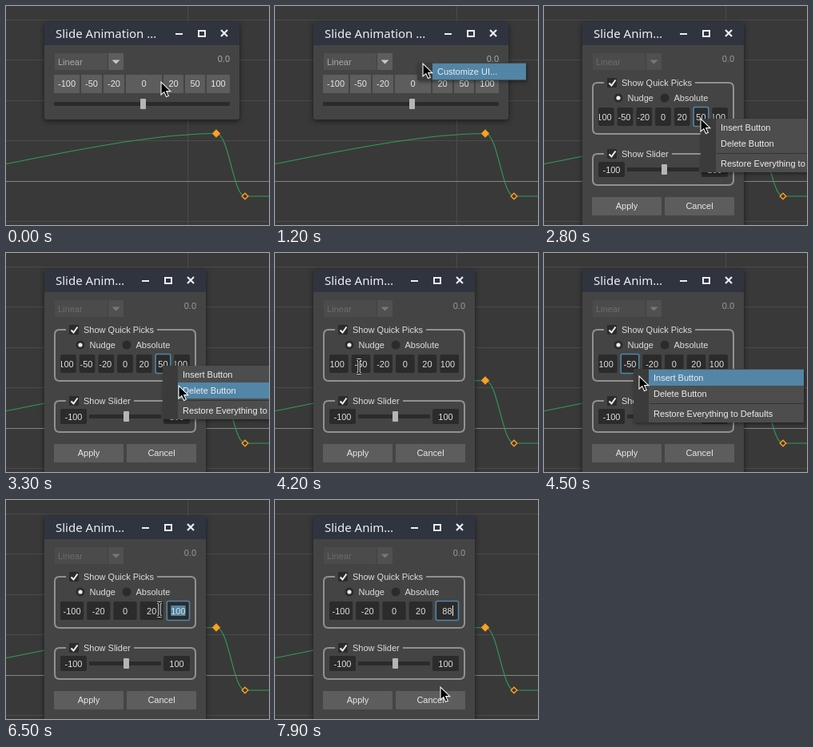
These frames come from a looping animation (329 px wide and 274 px high, 8 s). An HTML page:

```html
<!DOCTYPE html>
<html lang="en">
<head>
<meta charset="utf-8">
<title>Slide dialog</title>
<style>
html, body { margin: 0; width: 329px; height: 274px; overflow: hidden; background: #393939; }
svg { display: block; }
text { font: 11px "Liberation Sans", Arial, sans-serif; fill: #dedede; white-space: pre; }
.title { font: 500 15px "Noto Sans", "Open Sans", sans-serif; fill: #eceef2; }
.win { filter: drop-shadow(0 2px 3px rgba(0,0,0,.55)); }
.menu { filter: drop-shadow(1px 2px 2px rgba(0,0,0,.4)); }
</style>
</head>
<body>
<svg id="stage" width="329" height="274" viewBox="0 0 329 274"></svg>
<script>
const LOOP = 8000, TICK = 100;
const BLUE = '#5285a6', DARK = '#2b2b2b', BUTTON = '#5d5d5d';

// Pointer path: time, x, y of the hot spot
const PATH = [
  [0, 194, 95], [300, 194, 95], [600, 178, 71], [1100, 178, 71], [1400, 199, 75],
  [2100, 199, 75], [2500, 196, 141], [2900, 196, 141], [3300, 216, 166], [3600, 216, 166],
  [3900, 160, 160], [4200, 105, 142], [4400, 112, 145], [4700, 133, 171], [5200, 133, 171],
  [5600, 178, 152], [5900, 226, 142], [6000, 226, 141], [6300, 192, 137], [7500, 192, 137],
  [7700, 230, 185], [7900, 207, 234]
];

const EDIT_ITEMS = ['Insert Button', 'Delete Button', null, 'Restore Everything to Defaults'];
const MENUS = [
  { from: 800, to: 1900, x: 178, y: 71, w: 136, items: ['Customize UI...'] },
  { from: 2800, to: 3600, x: 196, y: 141, w: 213, items: EDIT_ITEMS, focus: 5 },
  { from: 4400, to: 5200, x: 112, y: 145, w: 213, items: EDIT_ITEMS, focus: 1 }
];

const rect = (x, y, w, h, fill, extra = '') =>
  `<rect x="${x}" y="${y}" width="${w}" height="${h}" fill="${fill}" ${extra}/>`;
const path = (d, stroke, width = 1, fill = 'none') =>
  `<path d="${d}" stroke="${stroke}" stroke-width="${width}" fill="${fill}"/>`;
const text = (s, x, y, anchor = 'start', fill = '#dedede') =>
  `<text x="${x}" y="${y}" text-anchor="${anchor}" style="fill:${fill}">${s}</text>`;
const textWidth = s => [...s].reduce((sum, c) => sum + (c === '-' ? 3.66 : 6.12), 0);

function pointer(t) {
  const i = PATH.findIndex(p => p[0] > t);
  if (i < 0) return PATH[PATH.length - 1].slice(1);
  const [t0, x0, y0] = PATH[i - 1], [t1, x1, y1] = PATH[i];
  const k = (t - t0) / (t1 - t0);
  return [Math.round(x0 + (x1 - x0) * k), Math.round(y0 + (y1 - y0) * k)];
}

function backdrop() {
  const rows = [17, 67, 118, 168, 269].map(y => `M0 ${y}.5H329`).join('');
  const diamond = (x, y, r, fill) =>
    path(`M${x} ${y - r}l${r} ${r}l${-r} ${r}l${-r} ${-r}z`, '#ff9f20', 1.4, fill);
  return rect(0, 0, 329, 274, '#393939') +
    path(rows + 'M227.5 0V274', '#4b4b4b') +
    path('M0 219.5H329', '#858585') +
    path('M0 197.5C90 180 185 160 263 159.5C279 159 284 238 299 238H329', '#2f9e58', 1.1) +
    diamond(263, 159.5, 4.2, '#ff9f20') + diamond(299, 238, 3.8, '#393939');
}

function frame(w, h, title) {
  const r = 48 + w, cx = r - 19;
  return `<g class="win">` + rect(48, 20, w, h, '#444', 'rx="3"') + '</g>' +
    path(`M48 49V23q0-3 3-3H${r - 3}q3 0 3 3V49z`, 'none', 0, '#2f343f') +
    `<text class="title" x="62" y="40">${title}</text>` +
    rect(cx - 61, 34, 9, 2, '#eceef2') +
    rect(cx - 32, 31, 8, 7, 'none', 'stroke="#eceef2" stroke-width="2"') +
    path(`M${cx - 4} 30l8 8m0 -8l-8 8`, '#eceef2', 2.2);
}

function combo(enabled) {
  const [base, side, ink, arrow] = enabled
    ? ['#505050', '#5d5d5d', '#aaa', '#c8c8c8'] : ['#4b4b4b', '#505050', '#6c6c6c', '#787878'];
  return rect(61, 59, 86, 21, base, 'rx="1"') + rect(128, 59, 19, 21, side) +
    path('M127.5 59V80', '#414141') + text('Linear', 65, 74, 'start', ink) +
    path('M132.500 67.500h10l-5 5z', 'none', 0, arrow);
}

const button = (label, x, y, w) =>
  rect(x, y, w, 23, BUTTON, 'rx="1"') + text(label, x + w / 2, y + 15, 'middle', '#e8e8e8');

const slider = (x, w, y, knob, h) =>
  rect(x, y, w, 5, DARK, 'rx="1"') + rect(knob, y - (h - 5) / 2, 7, h, '#b5b5b5', 'rx="1"');

function smallDialog() {
  const buttons = [['-100', 60, 32], ['-50', 94, 26], ['-20', 122, 26], ['0', 150, 45],
    ['20', 197, 25], ['50', 224, 25], ['100', 251, 29]];
  return frame(244, 122, 'Slide Animation ...') + combo(true) +
    text('0.0', 280, 70, 'end', '#aaa') +
    buttons.map(([s, x, w]) => button(s, x, 86, w)).join('') +
    slider(60, 220, 120, 168, 13);
}

function group(y, h, label, resume) {
  return path(`M75 ${y}H67q-6 0 -6 6v${h - 12}q0 6 6 6H231q6 0 6 -6v${12 - h}q0 -6 -6 -6H${resume}`, '#919191', 2) +
    rect(79, y - 6, 12, 12, DARK, 'rx="1"') +
    path(`M81.500 ${y + 0.5}l3 3l5 -7`, '#f0f0f0', 2) +
    text(label, 97, y + 4);
}

function radio(x, label, on) {
  return `<circle cx="${x}" cy="115" r="5.5" fill="${DARK}"/>` +
    (on ? `<circle cx="${x}" cy="115" r="2.6" fill="#ececec"/>` : '') +
    text(label, x + 11.5, 119);
}

function field(s, x, y, w, h, { focus, pick, caret } = {}) {
  const tw = textWidth(s);
  const end = tw > w - 6 ? w - (w < 22 ? 3 : 4.8) : (w + tw) / 2;
  const at = n => end - tw + textWidth(s.slice(0, n));
  let out = rect(x, y, w, h, DARK, 'rx="2"');
  if (focus) out += rect(x + .5, y - .5, w - 1, h + 1, 'none', `rx="2" stroke="${BLUE}" stroke-width="1.6"`);
  out += `<svg x="${x + 1}" y="${y}" width="${w - 2}" height="${h}"><g transform="translate(-1 0)">`;
  if (pick !== undefined) out += rect(at(pick), 5, end - at(pick), 13, BLUE);
  out += text(s, end, h / 2 + 4, 'end');
  if (caret !== undefined) out += rect(Math.round(x + at(caret)) - x, 5, 1, 13, '#f0f0f0');
  return out + '</g></svg>';
}

// State of the last quick pick while it is being edited
function lastPick(t) {
  if (t < 6000) return ['100', {}];
  if (t < 6100) return ['100', { focus: true, caret: 3 }];
  if (t < 7000) {
    const pick = Math.max(0, 2 - Math.floor((t - 6100) / TICK));
    return ['100', { focus: true, pick, caret: t < 6500 ? pick : undefined }];
  }
  const s = t < 7100 ? '' : t < 7400 ? '8' : '88';
  return [s, { focus: true, caret: s.length }];
}

function largeDialog(t, menu) {
  const [last, edit] = lastPick(t);
  const picks = ['-100', ...(t < 5200 ? ['-50'] : []), '-20', '0', '20', ...(t < 3600 ? ['50'] : []), last];
  const w = (162 - 4 * (picks.length - 1)) / picks.length;
  const fields = picks.map((s, i) => {
    const state = i === picks.length - 1 ? edit : { focus: menu && menu.focus === i };
    return field(s, 68 + i * (w + 4), 127, w, 23, state);
  }).join('');
  return frame(202, 270, 'Slide Anim…') + combo(false) +
    text('0.0', 238, 70, 'end', '#9a9a9a') +
    group(96, 64, 'Show Quick Picks', 189) + radio(93, 'Nudge', true) + radio(151, 'Absolute', false) + fields +
    group(185, 39, 'Show Slider', 160) +
    field('-100', 68, 195, 33, 19) + slider(104, 90, 202, 147, 13) + field('100', 197, 195, 33, 19) +
    button('Apply', 60, 239, 87) + button('Cancel', 151, 239, 87);
}

function popup({ x, y, w, items }, py) {
  let row = y + 1, out = '';
  for (const s of items) {
    if (!s) {
      out += path(`M${x + 20} ${row + 2.5}H${x + w}`, '#333');
      row += 5;
      continue;
    }
    if (py >= row && py < row + 20) out += rect(x + 19, row, w - 19, 20, BLUE);
    out += text(s, x + 25, row + 14, 'start', '#eee');
    row += 20;
  }
  const h = row - y;
  return `<g class="menu">` + rect(x, y, w, h + 1, '#4d4d4d') + '</g>' +
    rect(x, y, 19, h + 1, '#3b3b3b') + out;
}

function cursor(x, y, beam) {
  const shape = beam
    ? path('M-3 -8.500H-1L0 -7.500L1 -8.500H3M0 -7.500V7.500M-3 8.500H-1L0 7.500L1 8.500H3', '#f4f4f4', 3.2) +
      path('M-3 -8.500H-1L0 -7.500L1 -8.500H3M0 -7.500V7.500M-3 8.500H-1L0 7.500L1 8.500H3', '#000', 1.4)
    : path('M0 0V16L3.800 12.600L6.500 18.600L9.300 17.400L6.700 11.600H11.800Z', '#f4f4f4', 1.1, '#000');
  return `<g transform="translate(${x} ${y})">${shape}</g>`;
}

function draw(t) {
  const menu = MENUS.find(m => t >= m.from && t < m.to);
  const [x, y] = pointer(t);
  const beam = t >= 1900 && !menu && y > 126 && y < 151 && x > 67 && x < 231;
  return backdrop() + (t < 1900 ? smallDialog() : largeDialog(t, menu)) +
    (menu ? popup(menu, y) : '') + cursor(x, y, beam);
}

const stage = document.getElementById('stage');
const start = performance.now();
let shown = -1;
function play() {
  const t = Math.floor((performance.now() - start) % LOOP / TICK) * TICK;
  if (t !== shown) stage.innerHTML = draw(shown = t);
  requestAnimationFrame(play);
}
play();
</script>
</body>
</html>
```
